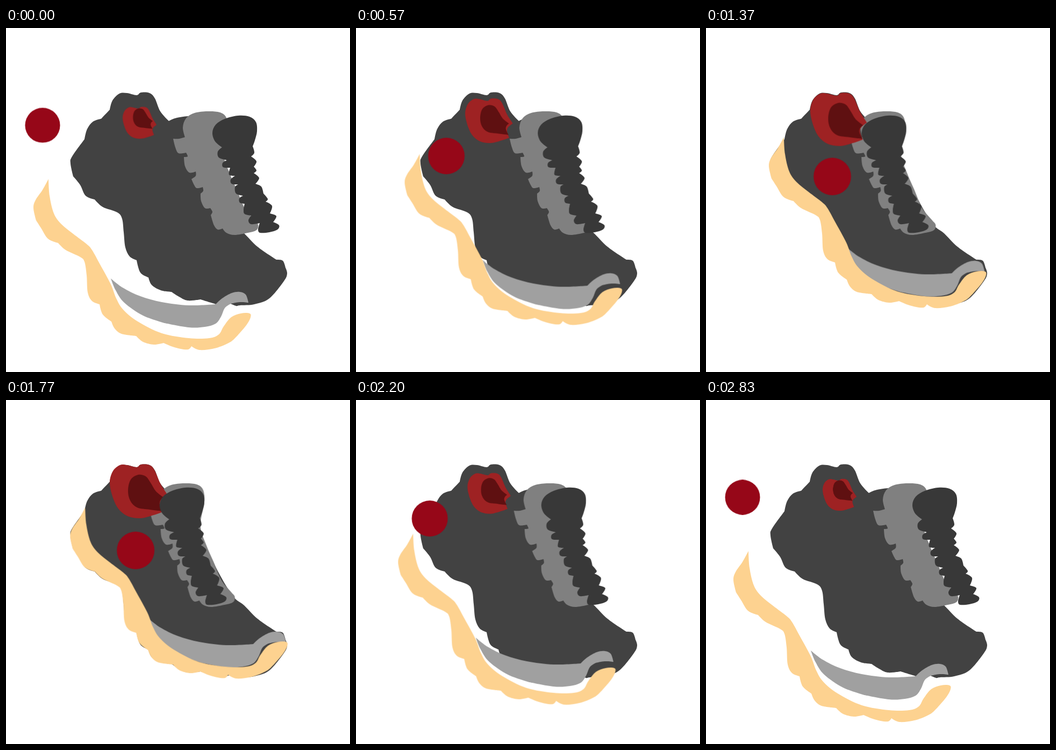
Recreate the animation shown at these times as an HTML page. Size 640 px wide and 640 px high, loop 2860 ms.

```html
<!DOCTYPE html>
<html lang="en">
<head>
<meta charset="utf-8">
<title>Running shoe</title>
<style>
  html, body { margin: 0; width: 100%; height: 100%; overflow: hidden; background: #fff; }
  svg { display: block; width: 100%; height: 100%; }
</style>
</head>
<body>
<svg id="stage" viewBox="0 0 640 640"></svg>
<script>
const LOOP = 2860;
const CLOSE = 'cubic-bezier(.3,.05,.1,1)';
const CLOSE_LATE = 'cubic-bezier(.4,0,.1,1)';
const OPEN = 'cubic-bezier(.3,.05,.1,1)';
const stage = document.getElementById('stage');

// Smooth closed outline through "x,y" points; a trailing "!" makes a corner.
function outline(text) {
  const pts = text.trim().split(/\s+/).map(s => {
    const [x, y] = s.replace('!', '').split(',').map(Number);
    return { x, y, sharp: s.endsWith('!') };
  });
  const at = i => pts[(i + pts.length) % pts.length];
  const handle = (i, dir) => {
    const p = at(i), k = p.sharp ? 0 : dir / 6;
    return [p.x + (at(i + 1).x - at(i - 1).x) * k, p.y + (at(i + 1).y - at(i - 1).y) * k];
  };
  let d = `M${pts[0].x},${pts[0].y}`;
  pts.forEach((p, i) => {
    const q = at(i + 1);
    d += `C${handle(i, 1)} ${handle(i + 1, -1)} ${q.x},${q.y}`;
  });
  return d + 'Z';
}

function add(tag, attrs) {
  const el = document.createElementNS('http://www.w3.org/2000/svg', tag);
  for (const key in attrs) el.setAttribute(key, attrs[key]);
  return stage.appendChild(el);
}

const shape = (fill, points) => add('path', { fill, d: outline(points) });

// Glide from the apart pose to the joined pose, then spring apart again.
function move(el, apart, joined, origin = '0 0', easing = CLOSE) {
  el.style.transformOrigin = origin;
  el.animate([
    { offset: 0, transform: apart, easing },
    { offset: 1900 / LOOP, transform: joined },
    { offset: 1920 / LOOP, transform: joined, easing: OPEN },
    { offset: 2820 / LOOP, transform: apart },
    { offset: 1, transform: apart }
  ], { duration: LOOP, iterations: Infinity });
}

const shift = (x, y) => `translate(${x}px, ${y}px)`;
const HOME = shift(0, 0);

// Upper
shape('#424242', `120,252 123,239 146,207! 151,188 162,174 177,169! 193,152!
  198,135 211,122 225,121 243,125 251,120 267,121 277,131 287,155 303,173!
  318,167 345,164 365,170 369,190 361,235 385,300 420,362 443,382 468,407 503,431!
  515,433 520,446! 523,457 517,471 490,503 462,514 435,516 428,517 416,512!
  400,516 388,513 362,505! 338,507 322,500 308,491! 288,488 271,478 265,464!
  250,455 243,432! 230,425 222,408 219,380 216,355 207,343 180,333 165,319!
  148,312 138,292 125,276!`);

const strip = shape('#a0a0a0', `195,466! 217,483 250,499 290,510 340,516 390,514!
  402,503 420,493 435,491 446,496 451,511! 435,510 418,513! 407,521 400,537
  390,550 370,556 340,557 295,549! 255,535 220,511 204,488`);
move(strip, HOME, shift(70, -60));

const sole = shape('#fdd290', `79,281! 81,312 89,345 103,365 125,383 150,402 160,413
  175,440 195,477 205,503 218,524 245,546 290,568 340,577 378,577 396,570 405,555
  419,538 437,531 453,531 455,538 447,553 425,578 412,587 388,596 360,599
  345,592! 339,598 325,597 310,593 293,586! 275,589 255,584 242,573!
  215,569 202,559 196,546! 180,533 174,514! 160,508 152,492 150,460 146,435
  138,426 111,413 97,400! 78,392 65,372 56,358! 51,335 55,320 68,301`);
move(sole, HOME, shift(68.5, -81));

const panel = shape('#808080', `329,185 335,168 351,158 375,155 398,157 410,167
  412,190 405,235 416,270 429,300 444,335 462,357 469,366 466,376 450,381 425,385
  410,381 403,373! 394,375 387,367 381,348! 384,342 380,335! 370,335 363,322
  362,308! 367,303 366,296! 355,298 350,292 345,281! 353,275 353,267!
  341,269 333,257 331,240! 338,239 335,232! 321,233 315,222 311,206! 322,206 333,203!`);
move(panel, HOME, shift(-43.5, 0));

const collar = shape('#9e2223', `193,152 199,132 212,121 225,121 243,125 251,120 267,121
  276,130 287,155 297,171! 300,176! 290,184 287,193 292,208! 275,214 250,220
  226,216 208,201 197,176`);
move(collar, 'scale(.59)', 'scale(1)', '251.5px 186px');

const lining = shape('#5f1011', `227,168 232,148 246,139 260,142 269,154 279,170
  293,181! 287,187 286,195 292,207! 268,204 244,200 231,187`);
move(lining, 'scale(.56)', 'scale(1)', '248px 163px');

const tongue = shape('#383838', `384,195 390,180 407,169 432,163 453,165 465,175 467,192
  463,209 459,220! 462,232 456,239! 466,248 461,258! 466,265 461,270! 471,279
  464,290! 475,295 479,308! 487,318 483,323! 495,331 491,345! 503,350
  497,361! 508,367 505,375 490,380 473,381 469,375 472,363! 456,365 451,358
  456,349! 444,346 442,338 444,327! 435,325 434,317 441,312! 428,308 426,296
  432,291! 420,290 418,282 426,275! 415,273 417,260! 404,259 403,251
  411,246! 396,241 394,230 402,222! 389,211`);
move(tongue, HOME, shift(-98.5, 0), '0 0', CLOSE_LATE);

// Side badge
const badge = add('circle', { cx: 241.5, cy: 280, r: 35, fill: '#960718' });
move(badge, shift(-173.5, -99) + ' scale(.93)', HOME + ' scale(1)', '241.5px 280px');
</script>
</body>
</html>
```
